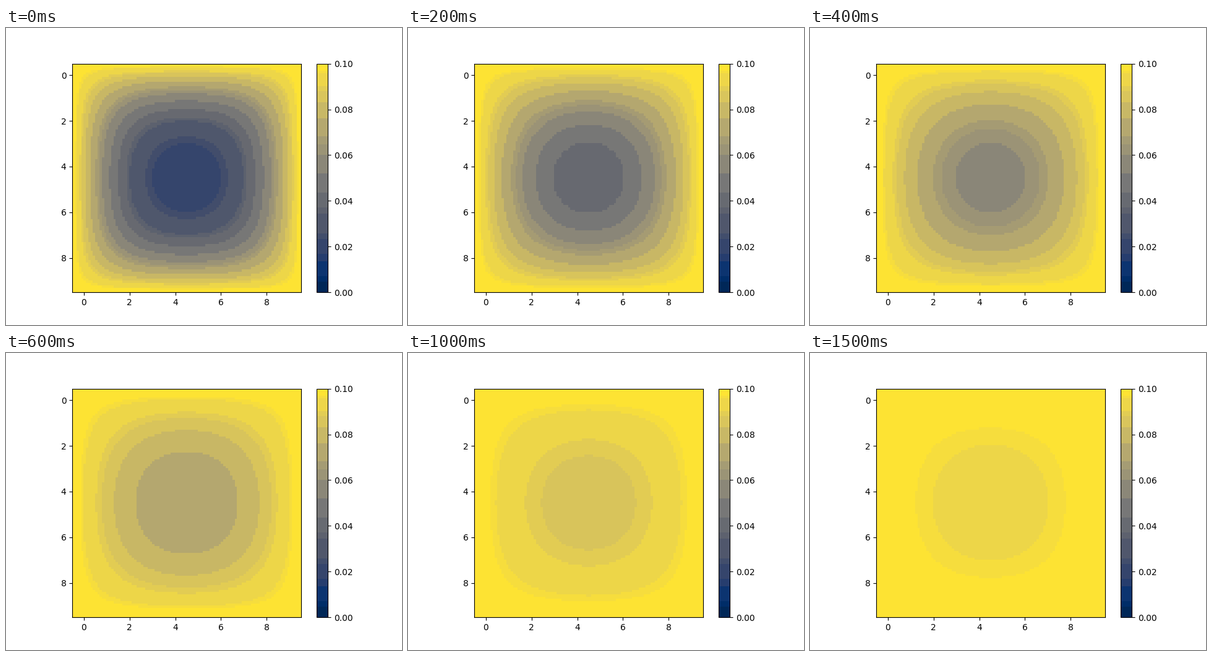
Animation of 640x480 px, one loop 9000 ms. Source, as a matplotlib script:

```python
import numpy as np
import matplotlib as mpl
import matplotlib.pyplot as plt
from matplotlib.animation import FuncAnimation
from matplotlib.colors import ListedColormap

CELLS = 100
EDGE = 0.1           # fixed temperature on the border
DEPTH = 0.0858       # how far the inside starts below the border
START, STEP = 0.2, 0.0905
FRAMES, INTERVAL = 90, 100
LATE_STEPS = (8, 10, 12, 15)

# Cividis reduced to flat bands (limits out of 256 levels)
LIMITS = [0, 12, 18, 35, 43, 60, 66, 88, 95, 112, 133, 154,
          166, 175, 195, 213, 225, 231, 245, 248, 256]


def banded_map():
    base = mpl.colormaps["cividis"]
    colors = []
    for lo, hi in zip(LIMITS, LIMITS[1:]):
        colors += [base((lo + hi) // 2)] * (hi - lo)
    return ListedColormap(colors)


def profile(age):
    """Sine series of a cooled slab with fixed ends."""
    x = np.linspace(0, 1, CELLS)
    modes = np.arange(1, 16, 2)[:, None]
    terms = np.exp(-modes**2 * age) * np.sin(modes * np.pi * x) / modes
    return 4 / np.pi * terms.sum(axis=0)


def field(step):
    g = profile(START + STEP * step)
    return EDGE - DEPTH * np.outer(g, g)


def held_step(frame):
    if frame < LATE_STEPS[0]:
        return frame
    return max(s for s in LATE_STEPS if s <= frame)


fig, ax = plt.subplots(figsize=(6.4, 4.8), dpi=100)
image = ax.imshow(field(0), cmap=banded_map(), vmin=0, vmax=EDGE,
                  extent=(-0.5, 9.5, 9.5, -0.5), interpolation="nearest")
fig.colorbar(image)


def update(frame):
    image.set_data(field(held_step(frame)))
    return [image]


anim = FuncAnimation(fig, update, frames=FRAMES, interval=INTERVAL,
                     repeat=True, repeat_delay=0)
plt.show()
```
